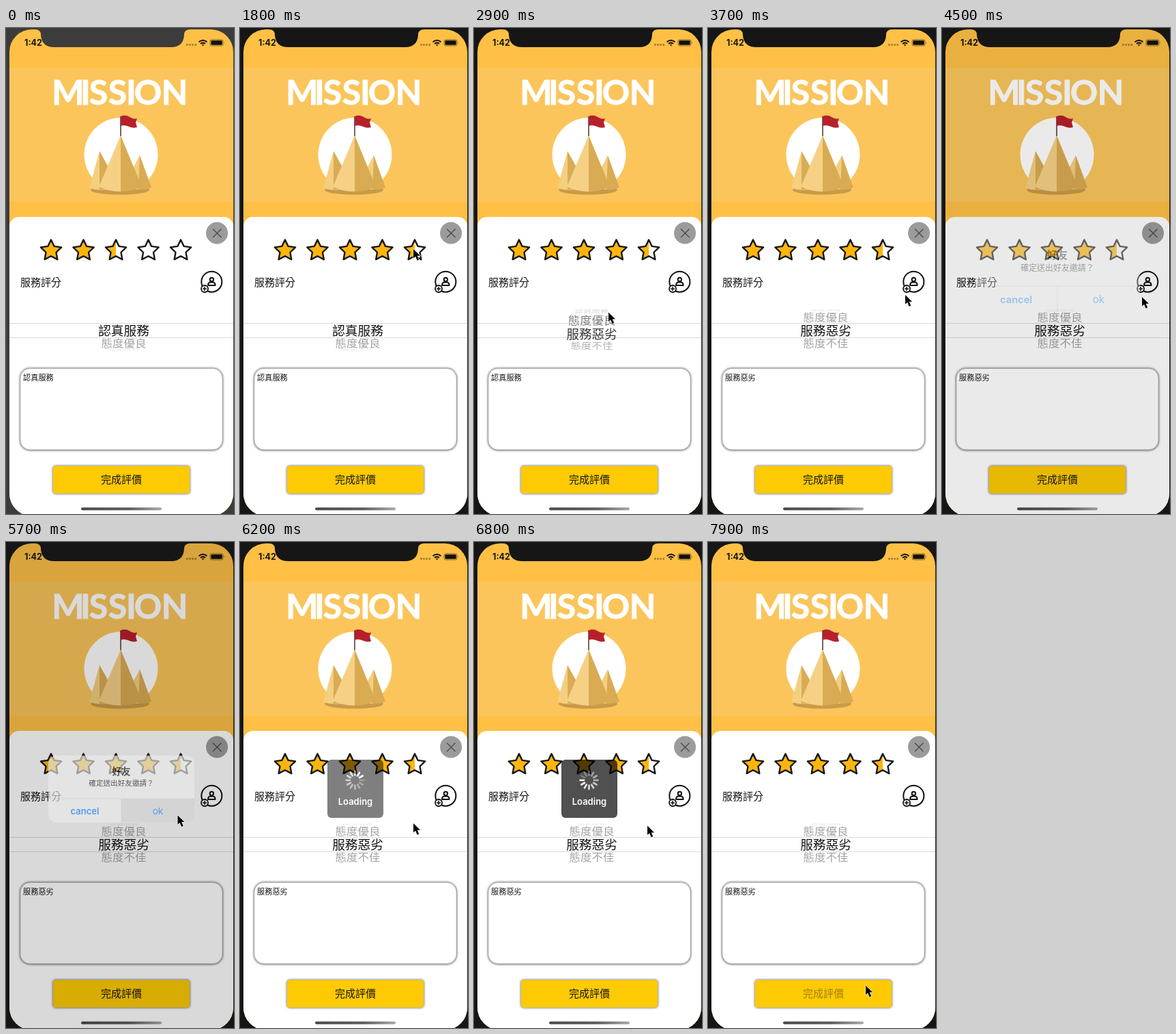
Write an HTML page that moves like this. It is 334 px wide and 710 px high and loops after 8 s.

```html
<!DOCTYPE html>
<html lang="zh-Hant">
<head>
<meta charset="utf-8">
<title>Service rating</title>
<style>
html, body { margin: 0; width: 100%; height: 100%; overflow: hidden; background: #161616; }
svg { display: block; width: 100%; height: 100%; }
text { font-family: "Noto Sans CJK TC", "Noto Sans CJK", "Noto Sans", sans-serif; fill: #151515; }
.mid { text-anchor: middle; }
.latin { font-family: Inter, sans-serif; }
.title { font: 700 50px Lato, sans-serif; fill: #fff; stroke: #fff; stroke-width: 1; }
.blue { fill: #0a7bf3; }
</style>
</head>
<body>
<svg viewBox="0 0 334 710">
  <defs>
    <clipPath id="screen"><rect x="5" y="2" width="328" height="711" rx="33"/></clipPath>
    <linearGradient id="bar">
      <stop stop-color="#484848"/><stop offset=".6" stop-color="#5c5c5c"/><stop offset="1" stop-color="#a8a8a8"/>
    </linearGradient>
    <filter id="glow" x="-10%" y="-20%" width="120%" height="140%"><feGaussianBlur stdDeviation="1.5"/></filter>
  </defs>
  <rect id="bezel" width="334" height="710"/>

  <g clip-path="url(#screen)">
    <rect width="334" height="710" fill="#ffc045"/>
    <rect y="58" width="334" height="196" fill="#fbc55b"/>

    <!-- banner -->
    <text class="title mid" x="91 116.5 135.5 163.5 183.5 208 247" y="112">MISSION</text>
    <circle cx="168.5" cy="185" r="54" fill="#fff"/>
    <ellipse cx="167" cy="236.5" rx="43" ry="7" fill="#c99a48"/>
    <path d="M137 180L122 234Q135 238 150 236V204Z" fill="#f4cf80"/>
    <path d="M137 180L154 210V236H137Z" fill="#d9ab53"/>
    <path d="M196 186L178 220V236H196Z" fill="#f4cf80"/>
    <path d="M196 186L213 233Q205 237 194 236Z" fill="#d9ab53"/>
    <path d="M168 157L136 232Q150 239 168 239Z" fill="#f6d085"/>
    <path d="M168 157L199 232Q186 239 168 239Z" fill="#d9ab53"/>
    <path d="M168 129V158" stroke="#5c3a34" stroke-width="1.6"/>
    <path d="M168 129Q175 126 181 130T192 132L190 138L192 145Q186 147 180 144T168 143Z" fill="#b71f2b"/>

    <!-- status bar -->
    <text class="latin" x="27" y="26" font-size="12.5" font-weight="700">1:42</text>
    <path d="M64.500 17L56.500 21.200L60.300 21.700L61 25.500Z" fill="none" stroke="#151515" stroke-width="1.2" stroke-linejoin="round"/>
    <path d="M264 24.500H279" stroke="#a07a32" stroke-width="2.500" stroke-dasharray="2.700 1.400"/>
    <g fill="none" stroke="#111" stroke-width="2">
      <path d="M282.500 20.500Q288.500 15.500 294.500 20.500M285 23Q288.500 20.200 292 23"/>
    </g>
    <path d="M286.800 24.600Q288.500 23.400 290.200 24.600L288.500 26.500Z" fill="#111"/>
    <rect x="299" y="17" width="19" height="9" rx="2.500" fill="none" stroke="#7a5c22" stroke-width=".9"/>
    <rect x="300.300" y="18.300" width="16.400" height="6.400" rx="1.300" fill="#111"/>
    <path d="M319.500 20Q321 21.500 319.500 23Z" fill="#7a5c22"/>

    <!-- sheet -->
    <rect x="5" y="276" width="328" height="450" rx="14" fill="#fff"/>
    <circle cx="309" cy="299.500" r="16" fill="#9b9b9b"/>
    <path d="M303 293.500L315.500 306M315.500 293.500L303 306" stroke="#4a4a4a" stroke-width="1.300"/>
    <g id="stars"></g>
    <text x="21" y="376.500" font-size="15">服務評分</text>
    <g fill="none" stroke="#111" stroke-width="2">
      <circle cx="301.300" cy="370.700" r="15"/>
      <circle cx="301.300" cy="367.500" r="2.700"/>
      <path d="M296 376Q296 371.500 299.500 371.500H303Q306.500 371.500 306.500 376Z" stroke-linejoin="round"/>
      <circle cx="291" cy="381" r="5" fill="#fff" stroke-width="1.800"/>
      <path d="M288 381H294M291 378V384" stroke-width="1.500"/>
    </g>
    <path d="M5 431.500H333M5 452.500H333" stroke="#d9d9d9"/>
    <g id="wheel"></g>
    <rect x="21" y="497.500" width="296" height="119" rx="14" fill="#777" stroke="#777" stroke-width="2" filter="url(#glow)"/>
    <rect x="21" y="497.500" width="296" height="118.500" rx="14" fill="#fff" stroke="#aaa" stroke-width=".7"/>
    <text id="note" x="25" y="514.500" font-size="11.200"></text>
    <rect x="69" y="640" width="200" height="40" rx="4" fill="#888" stroke="#888" stroke-width="2" filter="url(#glow)"/>
    <rect x="69" y="640" width="200" height="40" rx="4" fill="#fdca03"/>
    <text id="done" class="mid" x="169" y="665" font-size="15">完成評價</text>
    <rect x="110" y="700.500" width="118" height="4" rx="2" fill="url(#bar)"/>

    <rect id="dim" width="334" height="710"/>

    <g id="alert">
      <rect x="62" y="312" width="214" height="97.500" rx="12" fill="#ebebeb"/>
      <path id="press" d="M169 375H276V397.500Q276 409.500 264 409.500H169Z" fill="#d2d2d2"/>
      <path d="M62 375H276M169 375V409.500" stroke="#c9c9c9" stroke-width=".8"/>
      <text class="mid" x="169" y="340" font-size="13.500" font-weight="700">好友</text>
      <text class="mid" x="169" y="356" font-size="10.600">確定送出好友邀請？</text>
      <text class="mid latin blue" x="115.500" y="397.500" font-size="13" font-weight="600">cancel</text>
      <text class="mid latin blue" x="222.500" y="397.500" font-size="13.500">ok</text>
    </g>

    <g id="hud">
      <rect x="128" y="318" width="82" height="85" rx="6" fill-opacity=".8"/>
      <g id="spinner" stroke="#fff" stroke-width="2.600" stroke-linecap="round"></g>
      <text class="mid latin" x="169" y="383.500" font-size="13" font-weight="600" style="fill:#fff">Loading</text>
    </g>
  </g>

  <path id="notch" d="M42 0V2Q51 2 51 10Q52 28 71 28H242Q260 28 261 10Q261 2 270 2V0Z"/>
  <path id="cursor" d="M0 0V13.500L3.100 10.700L5.600 16.700L8.200 15.600L5.700 9.800H10Z" stroke="#fff" stroke-width="1.200" stroke-linejoin="round" paint-order="stroke"/>
</svg>
<script>
const LOOP = 8000, ROWS = ["認真服務", "態度優良", "服務惡劣", "態度不佳"];
const $ = id => document.getElementById(id);
const set = (el, attrs) => { for (const k in attrs) el.setAttribute(k, attrs[k]); return el; };
const add = (parent, tag, attrs) =>
  parent.appendChild(set(document.createElementNS("http://www.w3.org/2000/svg", tag), attrs));
const ramp = (t, start, length) => Math.min(1, Math.max(0, (t - start) / length));
const ease = p => p * p * (3 - 2 * p);

// time, x, y of the pointer tip
const PATH = [
  [100, 336, 560], [850, 161, 326], [1000, 161, 326], [1700, 254, 323], [1850, 254, 323],
  [2250, 200, 458], [2350, 200, 458], [2850, 197, 416], [3000, 197, 414], [3600, 289, 390],
  [4100, 289, 390], [4350, 293, 393], [4550, 293, 393], [5050, 251, 397], [5550, 251, 397],
  [6150, 254, 411], [7150, 254, 416], [7750, 231, 648], [8000, 231, 648]
];

function pointer(t) {
  const i = Math.max(1, PATH.findIndex(p => p[0] >= t));
  const [a, b] = [PATH[i - 1], PATH[i]];
  const p = ease(ramp(t, a[0], b[0] - a[0]));
  return [1, 2].map(k => a[k] + (b[k] - a[k]) * p);
}

function starPath(cx, half) {
  const points = [];
  for (let i = 0; i <= (half ? 5 : 9); i++) {
    const r = i % 2 ? 7.9 : 15.9, a = -Math.PI / 2 - i * Math.PI / 5;
    points.push(`${cx + r * Math.cos(a)} ${325.3 + r * Math.sin(a)}`);
  }
  return `M${points.join("L")}Z`;
}

const stars = [0, 1, 2, 3, 4].map(i => {
  const cx = 66 + 47.5 * i, gold = "#fdb50e";
  return [
    add($("stars"), "path", { d: starPath(cx, true), fill: gold }),
    add($("stars"), "path", { d: starPath(cx), fill: gold, stroke: "#171717", "stroke-width": 2.4, "stroke-linejoin": "round" })
  ];
});

const rows = ROWS.map(name => {
  const row = add($("wheel"), "text", { class: "mid", y: 7, "font-size": 18.7 });
  row.textContent = name;
  return row;
});

const ticks = Array.from({ length: 12 }, (_, i) =>
  add($("spinner"), "path", { d: "M0 -7.5V-13", transform: `translate(168.500 348) rotate(${i * 30})` }));

function drawWheel(pos) {
  rows.forEach((row, i) => {
    const d = i - pos, angle = d * 0.702, c = Math.cos(angle);
    const near = Math.abs(d), width = 1 - 0.5 * (1 - c);
    set(row, {
      transform: `translate(172.500 ${442 + 29.5 * Math.sin(angle)}) scale(${width} ${c})`,
      opacity: near < 1 ? 1 - 0.6 * near : Math.max(0, 0.4 - 0.3 * (near - 1)),
      display: near > 2.1 ? "none" : "inline"
    });
  });
}

function draw(t) {
  const [x, y] = pointer(t);
  set($("cursor"), { transform: `translate(${x} ${y})`, display: t < 100 ? "none" : "inline" });

  const frame = t < 1000 ? "#3c3c3c" : "#161616";
  set($("bezel"), { fill: frame });
  set($("notch"), { fill: frame });

  const dragX = t < 1000 ? 161 : t < 1750 ? x : 254;
  const rating = Math.round((dragX - 42) / 47.5 * 2) / 2;
  stars.forEach(([half, full], i) => {
    set(half, { opacity: rating - i >= 0.5 ? 1 : 0 });
    set(full, { "fill-opacity": rating - i >= 1 ? 1 : 0 });
  });

  drawWheel(2 * ease(ramp(t, 2350, 700)));
  $("note").textContent = ROWS[t < 3100 ? 0 : 2];
  set($("done"), { opacity: t < 7850 ? 1 : 0.4 });

  const shown = ease(ramp(t, 4380, 300)), gone = ease(ramp(t, 5600, 250));
  const zoom = 1.2 - 0.2 * shown;
  set($("dim"), { opacity: 0.23 * shown * (1 - gone) });
  set($("alert"), {
    opacity: shown * (1 - gone),
    transform: `translate(169 360.500) scale(${zoom}) translate(-169 -360.500)`
  });
  set($("press"), { opacity: t < 5350 ? 0 : 1 });

  set($("hud"), { opacity: ramp(t, 5950, 400) * (1 - ramp(t, 6750, 350)) });
  const lead = Math.floor(t / 83.3);
  ticks.forEach((tick, i) => set(tick, { opacity: 1 - 0.75 * ((lead - i + 1200) % 12) / 11 }));
}

function tick() {
  draw(performance.now() % LOOP);
  requestAnimationFrame(tick);
}
tick();
</script>
</body>
</html>
```
